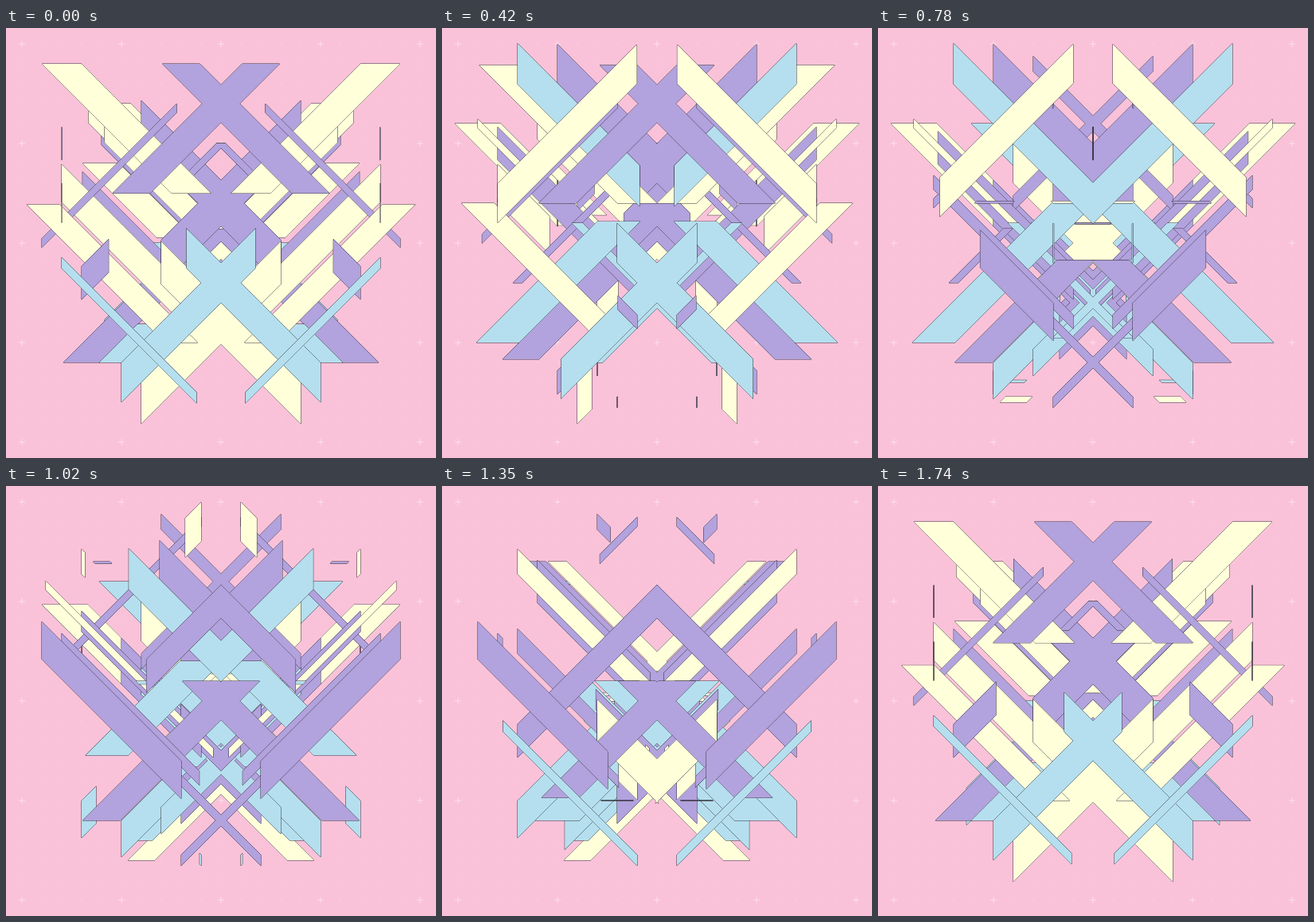
An HTML page that plays this animation: 540x540 px, repeating every 1.77 s.

```html
<!DOCTYPE html>
<html lang="en">
<head>
<meta charset="utf-8">
<title>Mirrored bars</title>
<style>
html, body { margin: 0; width: 100%; height: 100%; overflow: hidden; background: #fac2d9; }
svg { display: block; width: 100vw; height: 100vh; }
#bars path { stroke: #33303a; stroke-width: 1; paint-order: stroke; }
#grid { stroke: #fff; fill: none; }
</style>
</head>
<body>
<svg viewBox="0 0 540 540">
  <rect width="540" height="540" fill="#fac2d9"/>
  <g id="grid"></g>
  <g id="bars"></g>
</svg>
<script>
const LOOP = 1770, STEP = 30, GROW = 508, WIDTH = 540;
const YELLOW = '#ffffda', PURPLE = '#b2a2dd', BLUE = '#b5dfee';
const DIRECTIONS = { ne: [1, -1], nw: [-1, -1], se: [1, 1], sw: [-1, 1] };
const bars = [];

function addPath(parent, attributes) {
  const path = document.createElementNS('http://www.w3.org/2000/svg', 'path');
  for (const name in attributes) path.setAttribute(name, attributes[name]);
  document.getElementById(parent).append(path);
  return path;
}

// cut: V has vertical ends, H horizontal ones; leave: delay from growing to shrinking
function bar(fill, cut, x, y, heading, half, start, leave = 725, length = 175) {
  bars.push({ cut, x, y, dir: DIRECTIONS[heading], half, start, leave, length,
    path: addPath('bars', { fill }) });
}

function ease(u) {
  if (u <= 0) return 0;
  if (u >= 1) return 1;
  return u < 0.5 ? 4 * u ** 3 : 1 - 4 * (1 - u) ** 3;
}

const outline = points => 'M' + points.map(p => p.join(' ')).join('L') + 'Z';

function shape(b, time) {
  const age = (((time - b.start) % LOOP) + LOOP) % LOOP;
  const head = ease(age / GROW) * b.length;
  const tail = ease((age - b.leave) / GROW) * b.length;
  if (age > b.leave && head - tail < 0.5) return '';
  const [dx, dy] = b.dir;
  const [ox, oy] = b.cut === 'V' ? [0, b.half] : [b.half, 0];
  const at = (along, side) => [b.x + dx * along + side * ox, b.y + dy * along + side * oy];
  const points = [at(tail, -1), at(head, -1), at(head, 1), at(tail, 1)];
  // Reversed, so both halves wind alike and merge into one silhouette
  const mirrored = points.map(([x, y]) => [WIDTH - x, y]).reverse();
  return outline(points) + outline(mirrored);
}

function drawGrid() {
  let dots = '', crosses = '';
  for (let x = 20; x <= 520; x += 25) {
    for (let y = 20; y <= 520; y += 25) {
      if ((x - 20) % 125 || (y - 20) % 125) dots += `M${x - .5} ${y}h1`;
      else crosses += `M${x - 4} ${y}h8M${x} ${y - 4}v8`;
    }
  }
  addPath('grid', { d: dots, opacity: .35 });
  addPath('grid', { d: crosses, opacity: .45 });
}

// Back to front
bar(BLUE, 'H', 320, 295, 'nw', 28, 200);
bar(YELLOW, 'H', 170, 470, 'ne', 17, 671);
bar(BLUE, 'H', 175, 445, 'ne', 9, 700, 695);
bar(PURPLE, 'V', 145, 445, 'ne', 15, 220);
bar(BLUE, 'V', 95, 418.5, 'ne', 23.5, 870);
bar(YELLOW, 'V', 345, 345, 'nw', 25, 250);
bar(YELLOW, 'H', 320, 270, 'nw', 12, 835);
bar(PURPLE, 'H', 120, 95, 'se', 10.5, 945);
bar(PURPLE, 'V', 120, 120, 'se', 27, 1027);
bar(YELLOW, 'V', 95, 95, 'se', 15.5, 928);
bar(YELLOW, 'V', 295, 295, 'nw', 20, -420);
bar(YELLOW, 'H', 212, 263, 'nw', 23, -520, 725, 93);
bar(PURPLE, 'V', 95, 195, 'se', 15.5, 985);
bar(YELLOW, 'H', 45, 120, 'se', 29, 119);
bar(BLUE, 'V', 145, 443, 'ne', 23, 530, 700);
bar(PURPLE, 'V', 145, 220, 'se', 29, 387);
bar(BLUE, 'V', 195, 420, 'ne', 17, 390);
bar(PURPLE, 'H', 95, 420, 'ne', 23, -396);
bar(PURPLE, 'V', 345, 295, 'nw', 29, 1280);
bar(BLUE, 'H', 320, 245, 'sw', 28, 745);
bar(YELLOW, 'V', 245, 370, 'nw', 24, 1187);
bar(PURPLE, 'V', 370, 220, 'nw', 9.5, 262);
bar(PURPLE, 'V', 70, 220, 'ne', 6, 332, 716);
bar(PURPLE, 'V', 95, 170, 'se', 13, 360);
bar(PURPLE, 'V', 70, 145, 'se', 20.5, -45);
bar(YELLOW, 'V', 45, 120, 'se', 5.5, 203, 725, 215);
bar(PURPLE, 'H', 270, 145, 'sw', 6, -219);
bar(BLUE, 'H', 345, 420, 'nw', 7, -124);
bar(YELLOW, 'V', 345, 295, 'sw', 27, 1107);
bar(PURPLE, 'V', 145, 45, 'se', 24.5, 87);
bar(BLUE, 'H', 70, 395, 'ne', 27, 75);
bar(YELLOW, 'H', 70, 45, 'se', 25, -375);
bar(BLUE, 'V', 95, 45, 'se', 25.5, 72);
bar(PURPLE, 'H', 220, 45, 'se', 23.5, -375);
bar(PURPLE, 'V', 45, 270, 'ne', 5.5, -405);
bar(YELLOW, 'H', 220, 395, 'nw', 20.5, -438);
bar(BLUE, 'V', 395, 445, 'nw', 25, -400);
bar(PURPLE, 'H', 120, 420, 'ne', 23.5, 478, 697);
bar(PURPLE, 'V', 220, 470, 'ne', 7, 390, 695);
bar(PURPLE, 'V', 270, 145, 'sw', 21, 760, 687);
bar(PURPLE, 'V', 245, 369, 'nw', 9, 255, 690);
bar(PURPLE, 'V', 220, 369, 'nw', 23.5, 522, 697);
bar(BLUE, 'V', 245, 470, 'nw', 7, 950, 717);
bar(YELLOW, 'V', 70, 220, 'ne', 24.5, -45, 712);

let origin = null;
function frame(now) {
  if (origin === null) origin = now;
  const time = Math.floor(((now - origin) % LOOP) / STEP) * STEP;
  for (const b of bars) b.path.setAttribute('d', shape(b, time));
  requestAnimationFrame(frame);
}

drawGrid();
requestAnimationFrame(frame);
</script>
</body>
</html>
```
